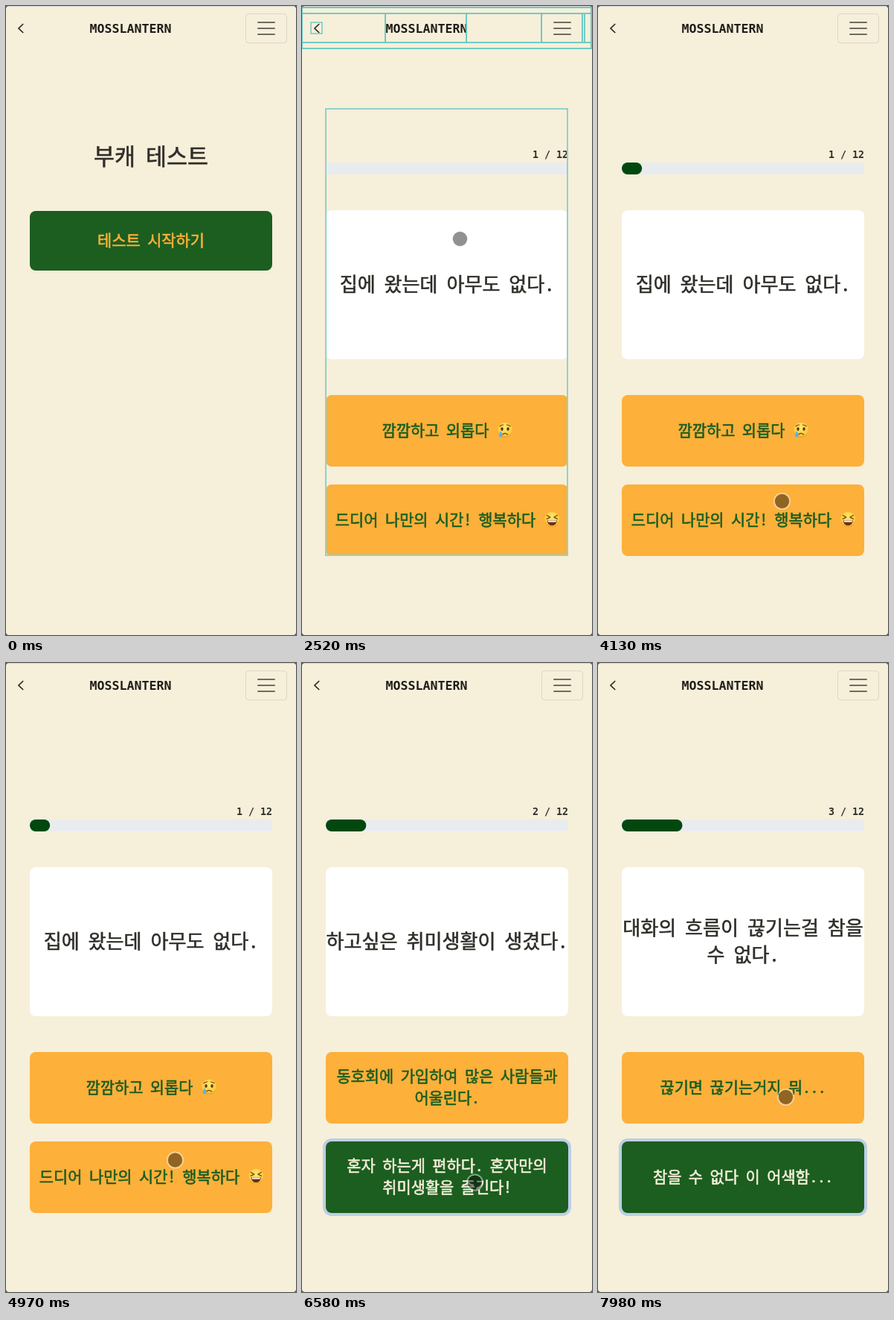
These frames come from a looping animation (390x844 px, 8 s). An HTML page:

```html
<!DOCTYPE html>
<html lang="ko">
<head>
<meta charset="utf-8">
<title>부캐 테스트</title>
<style>
html, body { margin: 0; width: 100%; height: 100%; overflow: hidden; background: #f6efda; }
svg { display: block; width: 100%; height: 100%; }
.ko { font-family: "Noto Sans Mono CJK KR", "Noto Sans CJK KR", "Noto Sans CJK", monospace; word-spacing: -.0435em; stroke-width: .6; }
.en { font-family: "DejaVu Sans Mono", monospace; font-weight: 700; }
</style>
</head>
<body>
<svg viewBox="0 0 390 844" xmlns="http://www.w3.org/2000/svg">
  <defs>
    <radialGradient id="skin" cx=".5" cy=".35" r=".65">
      <stop offset="0" stop-color="#ffe873"/>
      <stop offset=".7" stop-color="#fccb3c"/>
      <stop offset="1" stop-color="#e9a02b"/>
    </radialGradient>
    <g id="cry">
      <circle r="10.3" fill="url(#skin)"/>
      <path d="M-7-5.2Q-4.5-7.2-2.4-7M7-5.2Q4.5-7.2 2.4-7M-3.6 6.2Q0 2.6 3.6 6.2" fill="none" stroke="#74441a" stroke-width="1.2" stroke-linecap="round"/>
      <ellipse cx="-4" cy="-1.4" rx="1.7" ry="2.3" fill="#5b3413"/>
      <ellipse cx="4" cy="-1.4" rx="1.7" ry="2.3" fill="#5b3413"/>
      <path d="M-5.6 1.6Q-9 6-7.8 8.2Q-5.6 10.6-3.8 8.2Q-3 6-5.6 1.6Z" fill="#58b4ec"/>
    </g>
    <g id="laugh">
      <circle r="10.3" fill="url(#skin)"/>
      <path d="M-7-5.5L-2.4-3L-7-.8M7-5.5L2.4-3L7-.8" fill="none" stroke="#6b3d14" stroke-width="1.3" stroke-linecap="round" stroke-linejoin="round"/>
      <path d="M-6.6 1.2H6.6Q5.8 8 0 8Q-5.8 8-6.6 1.2Z" fill="#6b2f16"/>
      <path d="M-5.8 1.6H5.8L5.2 3.6H-5.2Z" fill="#fff"/>
    </g>
  </defs>
  <rect width="390" height="844" fill="#f6efda"/>
  <path d="M0 .5H390" stroke="#d6d6d4"/>
  <path d="M0 0H3Q.6.6 0 3ZM390 0H387Q389.4.6 390 3ZM0 844H3Q.6 843.4 0 841ZM390 844H387Q389.4 843.4 390 841Z" fill="#55534d"/>
  <path d="M23.2 24L17 30L23.2 36" fill="none" stroke="#2a2925" stroke-width="1.7"/>
  <rect x="322.5" y="10.5" width="55" height="39" rx="4" fill="none" stroke="#000" stroke-opacity=".1"/>
  <path d="M339 22H361M339 30H361M339 38H361" stroke="#000" stroke-opacity=".55" stroke-width="2" stroke-linecap="round"/>
  <g id="header"></g>
  <g id="intro"><rect x="32" y="275" width="326" height="80" rx="8" fill="#1b5e20"/></g>
  <g id="quiz">
    <rect x="32" y="210" width="326" height="16" rx="4" fill="#e9ecef"/>
    <rect id="bar" x="32" y="210" height="16" ry="8" fill="#00480f"/>
    <rect x="32" y="274" width="326" height="200" rx="8" fill="#fff"/>
    <rect x="32" y="522" width="326" height="96" rx="8" fill="#fdb03a"/>
    <rect x="32" y="642" width="326" height="96" rx="8" fill="#fdb03a"/>
    <g id="chosen">
      <rect x="28" y="638" width="334" height="104" rx="12" fill="#bccfe3"/>
      <rect x="32" y="642" width="326" height="96" rx="8" fill="#1b5e20"/>
    </g>
    <g id="q1">
      <use href="#cry" x="273" y="569"/>
      <use href="#laugh" x="336.3" y="689"/>
    </g>
    <g id="q2"></g>
    <g id="q3"></g>
  </g>
  <g fill="none" stroke-width="2">
    <g id="headFlash" stroke="#62c8c2">
      <path d="M0 2H389V57H0ZM0 10H389V49H0M380 10V49"/>
      <rect x="12" y="22" width="15" height="15" stroke-width="1.5"/>
      <rect x="112" y="10" width="109" height="39"/>
      <rect x="322" y="10" width="55" height="39"/>
    </g>
    <rect id="bodyFlash" x="32" y="138" width="325" height="599" stroke="#8fd2cb"/>
  </g>
  <g id="cursor">
    <circle r="10" fill="#000" fill-opacity=".43"/>
    <circle r="10.5" fill="none" stroke="#fff" stroke-opacity=".45" stroke-width="2"/>
  </g>
</svg>
<script>
const LOOP = 8000, STEP = 70, FLASH = 740, FILL = 1000, GLIDE = 420;
const INK = '#302e29', GREEN = '#1b5e20', ORANGE = '#fdb03a', CREAM = '#f6efda';
const START = [2520, 5110, 6720];   // when each question appears
const $ = id => document.getElementById(id);

function label(parent, str, x, cy, size, fill, kind, anchor = 'middle') {
  const el = document.createElementNS('http://www.w3.org/2000/svg', 'text');
  const attrs = { x, y: cy + size * 0.365, 'font-size': size, fill, class: kind, 'text-anchor': anchor };
  if (kind === 'ko') attrs.stroke = fill;
  for (const k in attrs) el.setAttribute(k, attrs[k]);
  el.textContent = str;
  $(parent).append(el);
}

// Lines centred around cy; a Hangul glyph is .92em wide, so "cell" is its width
function block(id, str, cy, cell, fill, x = 195) {
  const rows = str.split('\n');
  rows.forEach((row, i) =>
    label(id, row, x, cy + (i - (rows.length - 1) / 2) * cell * 1.5, cell / 0.92, fill, 'ko'));
}

function quizPage(n, ask, first, second, secondFill, x) {
  const id = 'q' + n;
  label(id, n + ' / 12', 358, 198.7, 13.3, INK, 'en', 'end');
  block(id, ask, 373, 24, INK);
  block(id, first, 569, 19.2, GREEN, x);
  block(id, second, 689, 19.2, secondFill, x);
}

label('header', 'MOSSLANTERN', 167.5, 30, 16.6, '#1f1d18', 'en');
block('intro', '부캐 테스트', 201.5, 28, INK);
block('intro', '테스트 시작하기', 314.5, 19.2, ORANGE);
quizPage(1, '집에 왔는데 아무도 없다.', '깜깜하고 외롭다', '드디어 나만의 시간! 행복하다', GREEN, 179.5);
quizPage(2, '하고싶은 취미생활이 생겼다.', '동호회에 가입하여 많은 사람들과\n어울린다.',
  '혼자 하는게 편하다. 혼자만의\n취미생활을 즐긴다!', CREAM);
quizPage(3, '대화의 흐름이 끊기는걸 참을\n수 없다.', '끊기면 끊기는거지 뭐...',
  '참을 수 없다 이 어색함...', CREAM);

// Pointer stops: arrival time, x, y
const STOPS = [
  [70, 351, 840], [840, 246, 364], [1190, 217, 318], [1680, 208.5, 318.5], [2240, 212.5, 312.5],
  [3430, 255, 705], [4130, 247.5, 664.5], [4270, 250, 579], [4620, 264, 572], [4970, 227.5, 667],
  [5950, 290, 610], [6300, 215, 710], [6580, 232.5, 697], [7350, 254, 603], [7980, 252.5, 582.5]
];

const clamp = v => Math.min(1, Math.max(0, v));
const smooth = v => v * v * (3 - 2 * v);

// Rest at each stop, then glide to the next one in time for its arrival
function pointer(t) {
  const i = Math.max(1, STOPS.findIndex(s => s[0] >= t));
  const [t0, x0, y0] = STOPS[i - 1], [t1, x1, y1] = STOPS[i];
  const k = smooth(clamp(1 - (t1 - t) / Math.min(GLIDE, t1 - t0)));
  return [x0 + (x1 - x0) * k, y0 + (y1 - y0) * k];
}

// CSS "ease": cubic-bezier(.25, .1, .25, 1)
function ease(x) {
  const bez = (u, a, b) => 3 * u * (1 - u) ** 2 * a + 3 * u * u * (1 - u) * b + u ** 3;
  let lo = 0, hi = 1;
  for (let i = 0; i < 20; i++) {
    const mid = (lo + hi) / 2;
    if (bez(mid, 0.25, 0.25) < x) lo = mid; else hi = mid;
  }
  return bez(lo, 0.1, 1);
}

const show = (id, on) => $(id).setAttribute('display', on ? 'inline' : 'none');

function draw(time) {
  const t = Math.floor((time % LOOP) / STEP) * STEP;
  const page = START.filter(s => t >= s).length;
  const age = page ? t - START[page - 1] : LOOP;
  show('intro', page === 0);
  show('quiz', page > 0);
  show('chosen', page > 1);
  for (let n = 1; n <= 3; n++) show('q' + n, page === n);

  const width = page ? 326 / 12 * (page - 1 + ease(clamp(age / FILL))) : 0;
  $('bar').setAttribute('width', width);
  $('bar').setAttribute('rx', Math.min(8, width / 2));

  const flash = 1 - clamp(age / FLASH) ** 2;
  $('bodyFlash').setAttribute('opacity', flash);
  $('headFlash').setAttribute('opacity', page === 1 ? flash * 0.9 : 0);

  show('cursor', t >= STOPS[0][0]);
  $('cursor').setAttribute('transform', `translate(${pointer(t)})`);
}

const begin = performance.now();
function tick() {
  draw(performance.now() - begin);
  requestAnimationFrame(tick);
}
tick();
</script>
</body>
</html>
```
